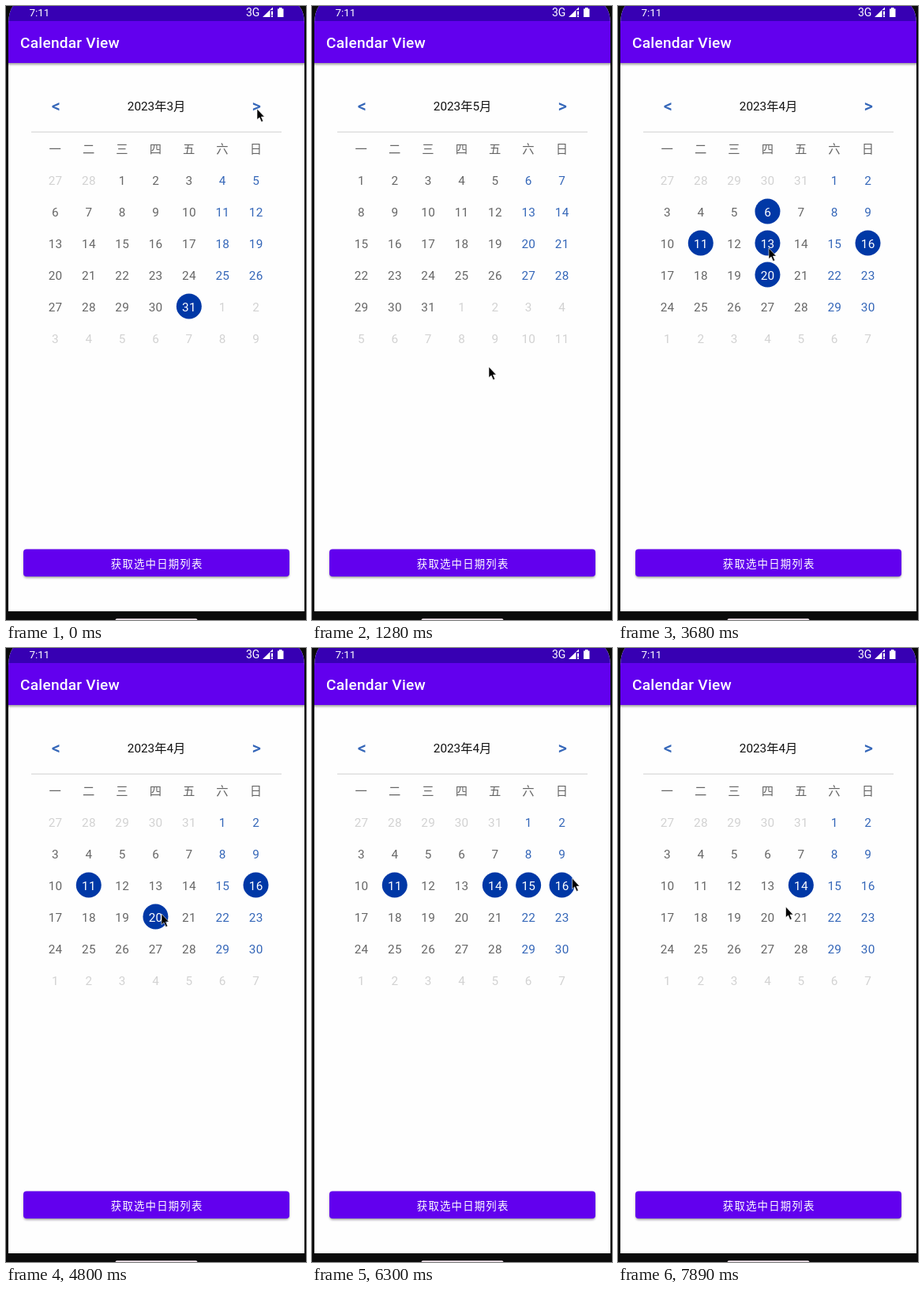
These frames come from a looping animation (380 by 776 pixels, 8000 ms). An HTML page:

```html
<!DOCTYPE html>
<html lang="zh">
<head>
<meta charset="utf-8">
<title>Calendar View</title>
<style>
html, body { margin: 0; width: 100%; height: 100%; overflow: hidden; background: #0b0b0b; }
svg { display: block; width: 380px; height: 776px; }
text { font-family: Roboto, "Noto Sans CJK SC", "Noto Sans CJK", sans-serif; font-size: 15.3px; }
.mid { text-anchor: middle; }
.day { letter-spacing: .3px; fill: #666; }
.end { fill: #3466b8; }
.out { fill: #d2d2d2; }
.on { fill: #fff; }
.arrow { font-size: 22px; font-weight: 500; fill: #3466b8; }
</style>
</head>
<body>
<svg id="stage" viewBox="0 0 380 776">
  <defs>
    <clipPath id="screen"><path d="M3 24C3 13 5 5 9 0H371C376 5 378 13 378 24V776H3Z"/></clipPath>
    <clipPath id="pager"><rect x="32" y="200" width="317" height="240"/></clipPath>
    <filter id="soft" x="-5%" y="-30%" width="110%" height="160%"><feGaussianBlur stdDeviation="1.5"/></filter>
  </defs>
  <g clip-path="url(#screen)">
    <rect width="380" height="765" fill="#fefefe"/>
    <rect y="22" width="380" height="52" fill="#000" opacity=".38" filter="url(#soft)"/>
    <rect y="19" width="380" height="53" fill="#6200ee"/>
    <rect width="380" height="19" fill="#3700b3"/>
    <text x="29.5" y="13" fill="#fff" style="font-size:13.4px">7:11</text>
    <text x="304" y="13" fill="#fff" style="font-size:14px">3G</text>
    <path d="M325 14L338 1.5V5H334.5V14Z M336 6.5H338V11.5H336Z M336 12.3H338V14H336Z" fill="#fff"/>
    <path d="M344 3.5H346V2H349.5V3.5H351.5V14H344Z" fill="#fff"/>
    <text x="18" y="52.7" fill="#fff" style="font-size:19.1px;font-weight:500;letter-spacing:.24px">Calendar View</text>
    <text class="mid arrow" x="63.3" y="134.3">&lt;</text>
    <text class="mid arrow" x="317.3" y="134.3">&gt;</text>
    <text id="title" class="mid" x="190.6" y="132" fill="#111"></text>
    <rect x="32" y="158.6" width="317" height="1.2" fill="#d6d6d6"/>
    <g id="week"></g>
    <g id="pages" clip-path="url(#pager)"></g>
    <rect x="22.5" y="688.5" width="336" height="34" rx="4" fill="#000" opacity=".42" filter="url(#soft)"/>
    <rect x="22" y="686.5" width="337" height="34.5" rx="4" fill="#6200ee"/>
    <text class="mid" x="191.2" y="710" fill="#fff" style="font-size:13.4px;letter-spacing:1.2px">获取选中日期列表</text>
  </g>
  <rect x="138.5" y="774.3" width="104" height="4" rx="2" fill="#f3e6ee"/>
  <path id="cursor" d="M0 0V13.6L3.1 10.9L5.5 16.4L7.7 15.5L5.4 10.1H9.4Z" fill="#000" stroke="#fff" stroke-width=".6"/>
</svg>
<script>
const LOOP = 8000, WIDTH = 317;
const $ = id => document.getElementById(id);

function add(parent, tag, attrs, text) {
  const el = document.createElementNS("http://www.w3.org/2000/svg", tag);
  for (const k in attrs) el.setAttribute(k, attrs[k]);
  if (text !== undefined) el.textContent = text;
  parent.appendChild(el);
  return el;
}

const colX = c => 62.4 + 42.35 * c;

[..."一二三四五六日"].forEach((s, c) =>
  add($("week"), "text", { class: "mid day", x: colX(c), y: 185.5 }, s));

// Month grid: lead = cells taken from the month before
function makePage(month, lead, days, prevDays) {
  const g = add($("pages"), "g", {});
  const cells = {};
  for (let i = 0; i < 42; i++) {
    const c = i % 7, y = 220 + 40 * Math.floor(i / 7), d = i - lead + 1;
    const inside = d > 0 && d <= days;
    const label = d < 1 ? d + prevDays : inside ? d : d - days;
    const base = "mid day" + (inside ? (c > 4 ? " end" : "") : " out");
    const dot = inside && add(g, "circle", { cx: colX(c), cy: y - .5, r: 16, fill: "#0038a6" });
    const text = add(g, "text", { class: base, x: colX(c) + .15, y: y + 5.6 }, label);
    if (inside) cells[d] = { dot, text, base };
  }
  return { month, g, cells };
}

function select(page, chosen) {
  for (const d in page.cells) {
    const { dot, text, base } = page.cells[d], on = chosen.has(+d);
    dot.style.display = on ? "" : "none";
    text.setAttribute("class", on ? "mid day on" : base);
  }
}

const pages = [makePage(3, 2, 31, 28), makePage(4, 5, 30, 31), makePage(5, 0, 31, 30)];
select(pages[0], new Set([31]));
select(pages[2], new Set());

// time, page index, slide offset
const slides = [[0, 0, 0], [270, 1, 22], [390, 1, 0], [760, 2, 40], [890, 2, 0],
  [2190, 1, -9], [2340, 1, -.6], [2470, 1, 0]];

// time, April day to toggle
const toggles = [[2870, 6], [3300, 13], [3680, 20], [4050, 13], [4550, 6], [5210, 20],
  [5610, 14], [6060, 15], [6450, 16], [7020, 15], [7500, 11]];

// start, step length, then pointer positions
const moves = [
  [0, 0, "318,130"],
  [890, 150, "222,584 216,714"],
  [1160, 120, "222,600 224,456 178,250 142,135"],
  [1670, 120, "105,131 83,130"],
  [1940, 250, "75,130 95,148"],
  [2340, 130, "169,253 185,262 189,263 189,263"],
  [2870, 130, "189,264 185,294"],
  [3150, 150, "184,296 190,324"],
  [3680, 120, "191,306 190,296"],
  [4050, 120, "190,295 191,280 192,264 192,258"],
  [4550, 125, "192,260 194,303 197,336"],
  [5070, 140, "199,337 200,336"],
  [5330, 130, "217,316 228,304"],
  [5610, 150, "265,307 275,303 275,298"],
  [6060, 120, "277,298 308,294 329.6,291"],
  [6450, 120, "327,292 282,303"],
  [6720, 150, "270,301 269,299 268,299"],
  [7140, 120, "225,303 160,308 112,306 108,305 115,309 158,321"],
  [7890, 0, "212.5,327"]
];
const path = moves.flatMap(([t, step, pts]) =>
  pts.split(" ").map((p, i) => [t + i * step, p]));

const at = (table, t) => table.findLast(row => row[0] <= t);

function draw(t) {
  const [, index, shift] = at(slides, t);
  $("title").textContent = `2023年${pages[index].month}月`;
  pages.forEach((p, i) =>
    p.g.setAttribute("transform", `translate(${(i - index) * WIDTH + shift})`));

  const chosen = new Set([11, 16]);
  for (const [when, day] of toggles)
    if (when <= t && !chosen.delete(day)) chosen.add(day);
  select(pages[1], chosen);

  $("cursor").setAttribute("transform", `translate(${at(path, t)[1]})`);
}

let start;
function tick(now) {
  start ??= now;
  draw((now - start) % LOOP);
  requestAnimationFrame(tick);
}
draw(0);
requestAnimationFrame(tick);
</script>
</body>
</html>
```
